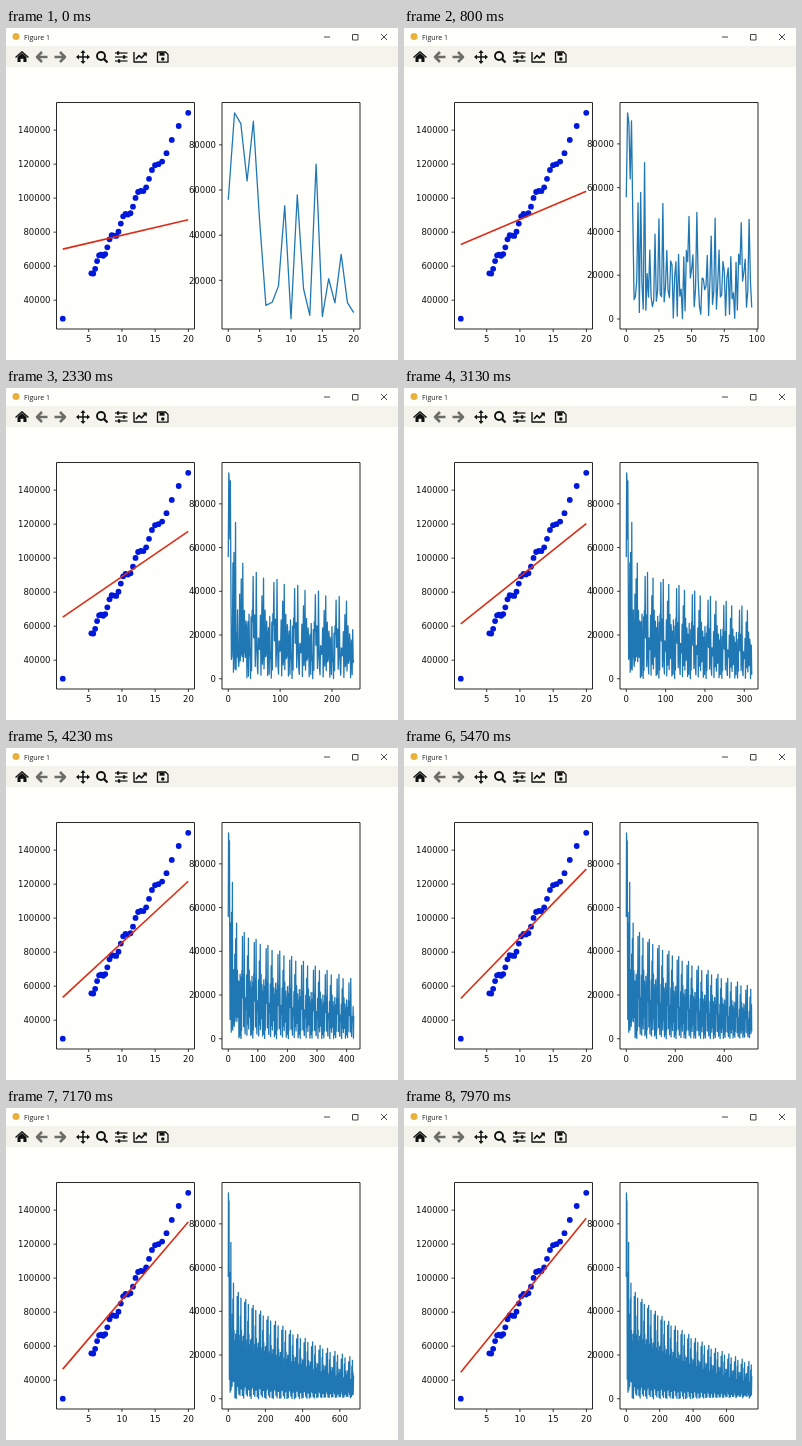
Recreate the animation shown at these times as an HTML page with a canvas. Size 392 by 332 pixels, loop 8000 ms.

```html
<!DOCTYPE html>
<html lang="en">
<head>
<meta charset="utf-8">
<title>Figure 1</title>
<style>
  html, body { margin: 0; width: 100%; height: 100%; overflow: hidden; background: #fefefb; }
  canvas { display: block; }
</style>
</head>
<body>
<canvas id="stage" width="392" height="332"></canvas>
<script>
const ctx = document.getElementById('stage').getContext('2d');
const LOOP = 8000;
const INK = '#111', GREY = '#6c6c68';

// A rising scatter: one early outlier, then a dense cloud that thins out to the right.
const COUNT = 35;
const samples = Array.from({ length: COUNT }, (_, rank) => {
  const u = rank - 1;
  const x = rank ? 5.4 + 0.28 * u + 0.0026 * u * u + 2.5 * Math.exp((u - 33) / 2) : 1.1;
  const wobble = rank ? 2600 * Math.cos(1.12 * (u - 4)) : 0;
  return [x, 29100 + 6350 * (x - 1.1) + wobble];
});

// Shuffled training order: an opening, then a stride through the ranks, repeated each epoch.
const EPOCH = 40;
const opening = [2, 21, 25, 17, 31, 19, 1, 3, 0, 23, 1, 27, 12, 5, 33, 8, 20, 15, 26, 6, 9];
const visit = i => opening[i] ?? (COUNT * 12 - 1 - 11 * (i - 28)) % COUNT;

// Stochastic gradient descent on y = slope * x + bias
const errors = [], fits = [];
for (let i = 0, slope = 0, bias = 0; i < 800; i++) {
  const [x, y] = samples[visit(i % EPOCH)];
  const error = y - (slope * x + bias);
  slope += 1e-4 * error * x;
  bias += 0.1 * error;
  errors.push(Math.abs(error));
  fits.push({ slope, bias });
}

// Steady training with one short stall.
function stepAt(t) {
  const stalled = Math.min(Math.max(t - 4700, 0), 310);
  return Math.floor(20 + 0.0955 * (t - stalled));
}

function trace(points) {
  ctx.beginPath();
  points.forEach(([x, y]) => ctx.lineTo(x, y));
}

function stroke(points, color, width) {
  trace(points);
  ctx.strokeStyle = color;
  ctx.lineWidth = width;
  ctx.stroke();
}

function fill(points, color) {
  trace(points);
  ctx.fillStyle = color;
  ctx.fill();
}

function disc(x, y, r, color) {
  ctx.beginPath();
  ctx.arc(x, y, r, 0, 2 * Math.PI);
  ctx.fillStyle = color;
  ctx.fill();
}

function rect(x, y, w, h, color) {
  ctx.fillStyle = color;
  ctx.fillRect(x, y, w, h);
}

// Draws content with 5% margins inside a framed box, then ticks and labels.
function drawAxes(left, [xMin, xMax], [yMin, yMax], xStep, yStep, content) {
  const top = 74.5, width = 138, height = 226.5, bottom = top + height;
  const sx = width / (xMax - xMin) / 1.1, sy = height / (yMax - yMin) / 1.1;
  const px = x => left + width / 22 + (x - xMin) * sx;
  const py = y => bottom - height / 22 - (y - yMin) * sy;
  content(px, py);

  ctx.strokeStyle = INK;
  ctx.lineWidth = 0.9;
  ctx.strokeRect(left, top, width, height);
  ctx.font = '8.5px "DejaVu Sans", sans-serif';
  ctx.fillStyle = INK;
  ctx.textAlign = 'center';
  for (let x = Math.ceil(xMin / xStep) * xStep; px(x) <= left + width; x += xStep) {
    stroke([[px(x), bottom], [px(x), bottom + 3]], INK, 0.8);
    ctx.fillText(x, px(x), bottom + 13);
  }
  ctx.textAlign = 'right';
  for (let y = Math.ceil(yMin / yStep - 0.1) * yStep; py(y) >= top; y += yStep) {
    stroke([[left - 3, py(y)], [left, py(y)]], INK, 0.8);
    ctx.fillText(y, left - 6, py(y) + 3.2);
  }
}

function niceStep(raw) {
  const unit = 10 ** Math.floor(Math.log10(raw));
  return unit * [1, 2, 2.5, 5, 10].find(m => m * unit >= raw);
}

const range = values => [Math.min(...values), Math.max(...values)];

function drawArrow(x, y, dir) {
  stroke([[x + 5.5 * dir, y], [x - 4 * dir, y]], GREY, 2.5);
  stroke([[x, y - 5], [x - 5 * dir, y], [x, y + 5]], GREY, 2.5);
}

function drawTitleBar() {
  disc(10, 8.5, 3.5, '#e9b23c');
  ctx.font = '7px "Open Sans", sans-serif';
  ctx.textAlign = 'left';
  ctx.fillStyle = '#222';
  ctx.fillText('Figure 1', 18, 11.5);
  stroke([[318, 9], [324, 9]], '#333', 0.9);
  ctx.strokeRect(346.5, 6.5, 5.5, 5.5);
  stroke([[375, 6], [381, 12]], '#333', 0.9);
  stroke([[381, 6], [375, 12]], '#333', 0.9);
}

function drawToolbar() {
  rect(0, 18, 392, 21, '#f4f4ec');
  // home
  rect(11.5, 29, 9, 5, INK);
  fill([[11.5, 29], [16, 25], [20.5, 29]], INK);
  stroke([[9.5, 29.5], [16, 23.8], [22.5, 29.5]], INK, 1.3);
  rect(14.6, 30.8, 2.8, 3.2, '#f4f4ec');
  // back and forward
  drawArrow(36, 29, 1);
  drawArrow(54, 29, -1);
  // pan
  for (const [dx, dy] of [[1, 0], [-1, 0], [0, 1], [0, -1]]) {
    const x = 77 + dx * 4, y = 29 + dy * 4;
    stroke([[77, 29], [x, y]], INK, 1.5);
    fill([[x + dx * 3, y + dy * 3], [x + dy * 2.5, y + dx * 2.5], [x - dy * 2.5, y - dx * 2.5]], INK);
  }
  // zoom
  ctx.beginPath();
  ctx.arc(95, 28, 4, 0, 2 * Math.PI);
  ctx.lineWidth = 1.9;
  ctx.stroke();
  stroke([[98, 31], [101.5, 34.5]], INK, 2.3);
  // sliders
  [112, 118, 113].forEach((knob, i) => {
    const y = 25 + 4 * i;
    stroke([[109, y], [121.5, y]], INK, 1.2);
    rect(knob - 1, y - 1.7, 2.2, 3.4, INK);
  });
  // chart
  stroke([[128, 24], [128, 34], [141, 34]], INK, 1.4);
  stroke([[130, 31], [133, 27.5], [135.5, 30], [139, 26]], INK, 1.6);
  fill([[136.5, 24.5], [140.8, 24.5], [140.8, 28.8]], INK);
  // save
  stroke([[151.5, 24], [159.5, 24], [162, 26.5], [162, 34.2], [151.5, 34.2], [151.5, 24]], INK, 1.3);
  rect(153.5, 24.5, 5, 3.2, INK);
  disc(156.8, 31, 1.7, INK);
}

function draw(t) {
  const last = stepAt(t);
  const xRange = range(samples.map(s => s[0]));
  const yRange = range(samples.map(s => s[1]));
  const shown = errors.slice(0, last + 1);
  const { slope, bias } = fits[last];

  ctx.lineJoin = 'round';
  rect(0, 0, 392, 332, '#fefefb');
  drawTitleBar();
  drawToolbar();
  drawAxes(50.5, xRange, yRange, 5, 20000, (px, py) => {
    samples.forEach(([x, y]) => disc(px(x), py(y), 2.9, '#0018dc'));
    stroke(xRange.map(x => [px(x), py(slope * x + bias)]), '#dc2c18', 1.6);
  });
  drawAxes(216, [0, last], range(shown), niceStep(last * 1.1 / 5), 20000, (px, py) => {
    stroke(shown.map((e, i) => [px(i), py(e)]), '#1f77b4', 1.28);
  });
}

function tick() {
  draw(performance.now() % LOOP);
  requestAnimationFrame(tick);
}
tick();
</script>
</body>
</html>
```
